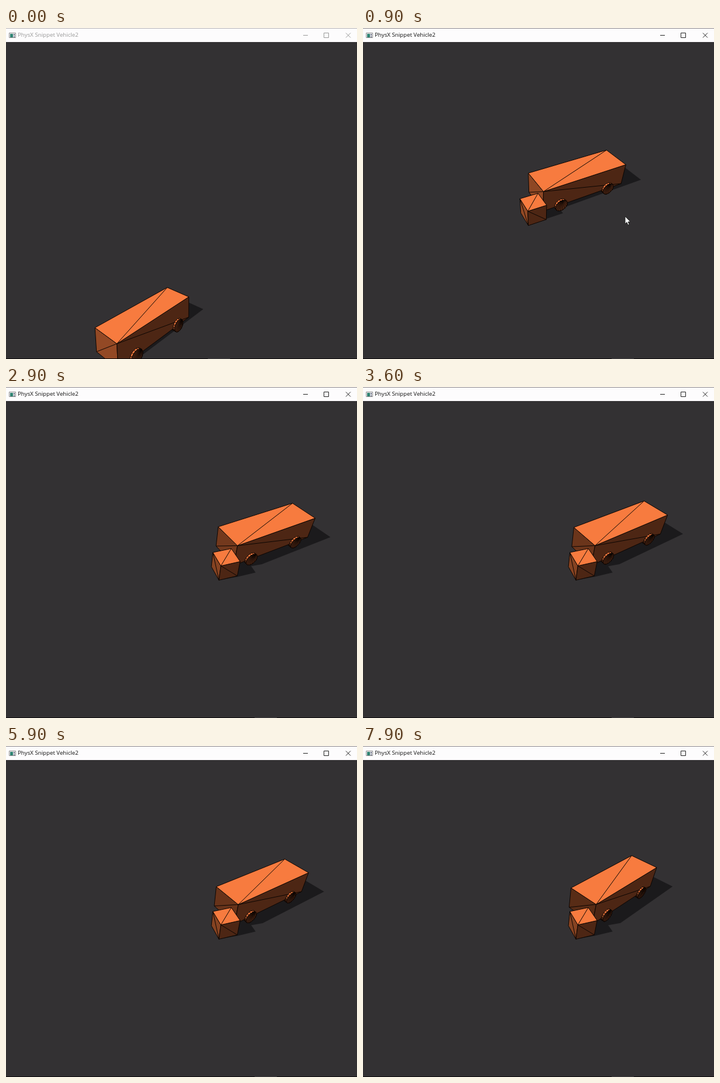
Write an HTML page with a canvas that moves like this. It is 600 px wide and 566 px high and loops after 8000 ms.

```html
<!DOCTYPE html>
<html lang="en">
<head>
<meta charset="utf-8">
<title>Vehicle</title>
<style>
  html, body { margin: 0; width: 100%; height: 100%; overflow: hidden; background: #333133; }
  canvas { position: absolute; left: 0; top: 0; }
  #title { position: absolute; left: 20px; top: 5px; font: 9.7px/14px "Open Sans", "Noto Sans", sans-serif; white-space: pre; }
</style>
</head>
<body>
<canvas id="stage" width="600" height="566"></canvas>
<div id="title">PhysX Snippet Vehicle2</div>
<script>
const LOOP = 8000, STEP = 100, ACTIVATE = 500;
const ctx = document.getElementById('stage').getContext('2d');
const title = document.getElementById('title');

const INK = '#0c0603', SHADOW = '#1b1a1c', ORANGE = [247, 123, 63];

// World units: camera above the origin, x right, h up, z ahead
const CAMERA_HEIGHT = 1.19, FOCAL = 468, CENTER_X = 300.5, CENTER_Y = 295.5;
const AMBIENT = 0.31, LIGHT = { x: -0.354, h: 0.69, z: 0.354 };
const SHADOW_X = 0.98, SHADOW_Z = 0.24;

const CHASSIS = { length: 0.603, width: 0.2025, low: 0.035, high: 0.19 };
const CUBE = { length: 0.119, width: 0.119, low: 0, high: 0.118, x: 0.2582, z: 1.1741 };
const WHEEL = { radius: 0.042, along: 0.18, inner: 0.075, outer: 0.115, facets: 16 };
// The chassis swings about a point near its nose
const SWING = { radius: 0.292, angle: 11.5 };

const rad = degrees => degrees * Math.PI / 180;

// Straight motion between [time, value] points
function track(t, ...keys) {
  const next = keys.findIndex(key => key[0] > t);
  if (next < 0) return keys[keys.length - 1][1];
  const [t0, a] = keys[next - 1] || keys[0], [t1, b] = keys[next];
  return a + (b - a) * Math.max(0, t - t0) / (t1 - t0 || 1);
}

const camera = { yaw: 0, pitch: 0 };

function aimCamera(t) {
  camera.yaw = rad(track(t, [0, 39.7], [900, 14], [1300, 0]));
  camera.pitch = rad(track(t, [0, 10.7], [900, 41.5], [1300, 43]));
}

function vehicleAt(t) {
  const heading = track(t, [0, 10.3], [900, 13], [1800, 20.8], [3900, 32.5], [6400, 32.5], [7900, 39.6]);
  const pivotX = track(t, [0, 0.556], [900, 0.324], [1800, 0.31]);
  const pivotZ = track(t, [0, 1.237], [900, 1.213], [1800, 1.235]);
  const swing = rad(heading + SWING.angle);
  return {
    ...CHASSIS,
    heading: rad(heading),
    x: pivotX + SWING.radius * Math.cos(swing),
    z: pivotZ + SWING.radius * Math.sin(swing),
    spin: pivotX / WHEEL.radius
  };
}

const cubeAt = t => ({ ...CUBE, heading: rad(track(t, [900, 11], [1800, 17.3])) });

function project({ x, h, z }) {
  const { yaw, pitch } = camera;
  const right = x * Math.cos(yaw) - z * Math.sin(yaw);
  const ahead = x * Math.sin(yaw) + z * Math.cos(yaw);
  const below = CAMERA_HEIGHT - h;
  const depth = ahead * Math.cos(pitch) + below * Math.sin(pitch);
  const down = below * Math.cos(pitch) - ahead * Math.sin(pitch);
  return [CENTER_X + FOCAL * right / depth, CENTER_Y + FOCAL * down / depth];
}

// Local axes: along runs nose to tail, side runs toward the viewer
function rotate(body, along, side) {
  const c = Math.cos(body.heading), s = Math.sin(body.heading);
  return { x: along * c + side * s, z: along * s - side * c };
}
function place(body, along, side, h) {
  const r = rotate(body, along, side);
  return { x: body.x + r.x, h, z: body.z + r.z };
}

function shade(body, along, side, up) {
  const n = rotate(body, along, side);
  const light = AMBIENT + Math.max(0, n.x * LIGHT.x + n.z * LIGHT.z + up * LIGHT.h);
  return `rgb(${ORANGE.map(v => Math.round(v * Math.min(1, light)))})`;
}

function trace(points) {
  ctx.beginPath();
  points.forEach(p => ctx.lineTo(p[0], p[1]));
}
function poly(points, fill, stroke) {
  trace(points);
  ctx.closePath();
  ctx.fillStyle = fill;
  ctx.fill();
  if (stroke) { ctx.strokeStyle = stroke; ctx.stroke(); }
}
function line(color, ...points) {
  trace(points);
  ctx.strokeStyle = color;
  ctx.stroke();
}

// Left, front, right and back corners at one height
function ring(body, h) {
  const l = body.length / 2, w = body.width / 2;
  return [[-l, -w], [-l, w], [l, w], [l, -w]].map(([along, side]) => place(body, along, side, h));
}

function drawShadow(body) {
  const cast = p => project({ x: p.x + SHADOW_X * p.h, h: 0, z: p.z + SHADOW_Z * p.h });
  const low = ring(body, body.low).map(cast), high = ring(body, body.high).map(cast);
  poly([low[1], high[1], high[2], high[3], low[3]], SHADOW);
}

function drawBox(body, flipNose) {
  const [a, b, c, d] = ring(body, body.high).map(project);
  const [al, bl, cl] = ring(body, body.low).map(project);
  poly([a, b, bl, al], shade(body, -1, 0, 0), INK);
  poly([b, c, cl, bl], shade(body, 0, 1, 0), INK);
  poly([a, b, c, d], shade(body, 0, 0, 1), INK);
  line(INK, b, d);
  line(INK, b, cl);
  if (flipNose) line(INK, a, bl); else line(INK, al, b);
}

function drawWheel(body, along, inner, outer) {
  const { radius, facets } = WHEEL;
  const angles = Array.from({ length: facets }, (_, i) => i / facets * 2 * Math.PI + body.spin);
  const circle = side => angles.map(a =>
    project(place(body, along + radius * Math.cos(a), side, radius + radius * Math.sin(a))));
  const back = circle(inner), face = circle(outer);
  angles.forEach((a, i) => {
    const j = (i + 1) % facets, middle = a + Math.PI / facets;
    poly([back[i], back[j], face[j], face[i]], shade(body, Math.cos(middle), 0, Math.sin(middle)), INK);
  });
  poly(face, shade(body, 0, 1, 0), INK);
  face.forEach(p => line(INK, face[0], p));
}

function drawVehicle(body) {
  const ends = [WHEEL.along, -WHEEL.along];
  ctx.lineWidth = 0.8;
  ends.forEach(along => drawWheel(body, along, WHEEL.inner, WHEEL.outer));
  ctx.lineWidth = 1;
  drawBox(body, false);
  ctx.lineWidth = 0.8;
  ends.forEach(along => drawWheel(body, along, body.width / 2, WHEEL.outer));
  ctx.lineWidth = 1;
}

function drawWindow(active) {
  ctx.fillStyle = '#333133';
  ctx.fillRect(0, 0, 600, 566);
  ctx.fillStyle = '#0b090b';
  ctx.fillRect(0, 565, 600, 1);
  ctx.fillStyle = '#3c3a3c';
  ctx.fillRect(active ? 425 : 345, 565, 38, 1);
}

function drawTitleBar(active) {
  const color = active ? '#222' : '#999';
  ctx.fillStyle = '#fdfcfd';
  ctx.fillRect(0, 0, 600, 24);
  ctx.fillStyle = active ? '#8a878a' : '#b5b2b5';
  ctx.fillRect(0, 0, 600, 1);

  ctx.strokeStyle = '#888';
  ctx.strokeRect(5.5, 8.5, 11, 8);
  ctx.fillStyle = '#2f8272';
  ctx.fillRect(7, 10, 5, 6);
  ctx.fillStyle = '#6b6f86';
  ctx.fillRect(13, 10, 2, 3);
  ctx.fillRect(13, 14, 2, 2);

  line(color, [508, 12.5], [516, 12.5]);
  ctx.strokeStyle = color;
  ctx.strokeRect(543.5, 8.5, 8, 8);
  line(color, [581, 8.5], [589, 16.5]);
  line(color, [589, 8.5], [581, 16.5]);
  title.style.color = active ? '#111' : '#999';
}

function drawCursor(t) {
  const x = track(t, [500, 590], [900, 448]), y = track(t, [500, 400], [900, 322]);
  const shape = [[0, 0], [0, 13], [3, 10.3], [5, 15], [7.2, 14], [5.2, 9.6], [9, 9.3]];
  poly(shape.map(p => [x + p[0], y + p[1]]), '#fff', '#222');
}

function draw(t) {
  const active = t >= ACTIVATE;
  aimCamera(t);
  const vehicle = vehicleAt(t), cube = cubeAt(t);
  ctx.lineWidth = 1;
  ctx.lineJoin = 'round';
  drawWindow(active);
  ctx.save();
  ctx.beginPath();
  ctx.rect(0, 24, 600, 541);
  ctx.clip();
  drawShadow(vehicle);
  drawShadow(cube);
  drawVehicle(vehicle);
  drawBox(cube, true);
  if (active && t < 1000) drawCursor(t);
  ctx.restore();
  drawTitleBar(active);
}

const start = performance.now();
function tick() {
  const t = (performance.now() - start) % LOOP;
  draw(Math.floor(t / STEP) * STEP);
  requestAnimationFrame(tick);
}
tick();
</script>
</body>
</html>
```
